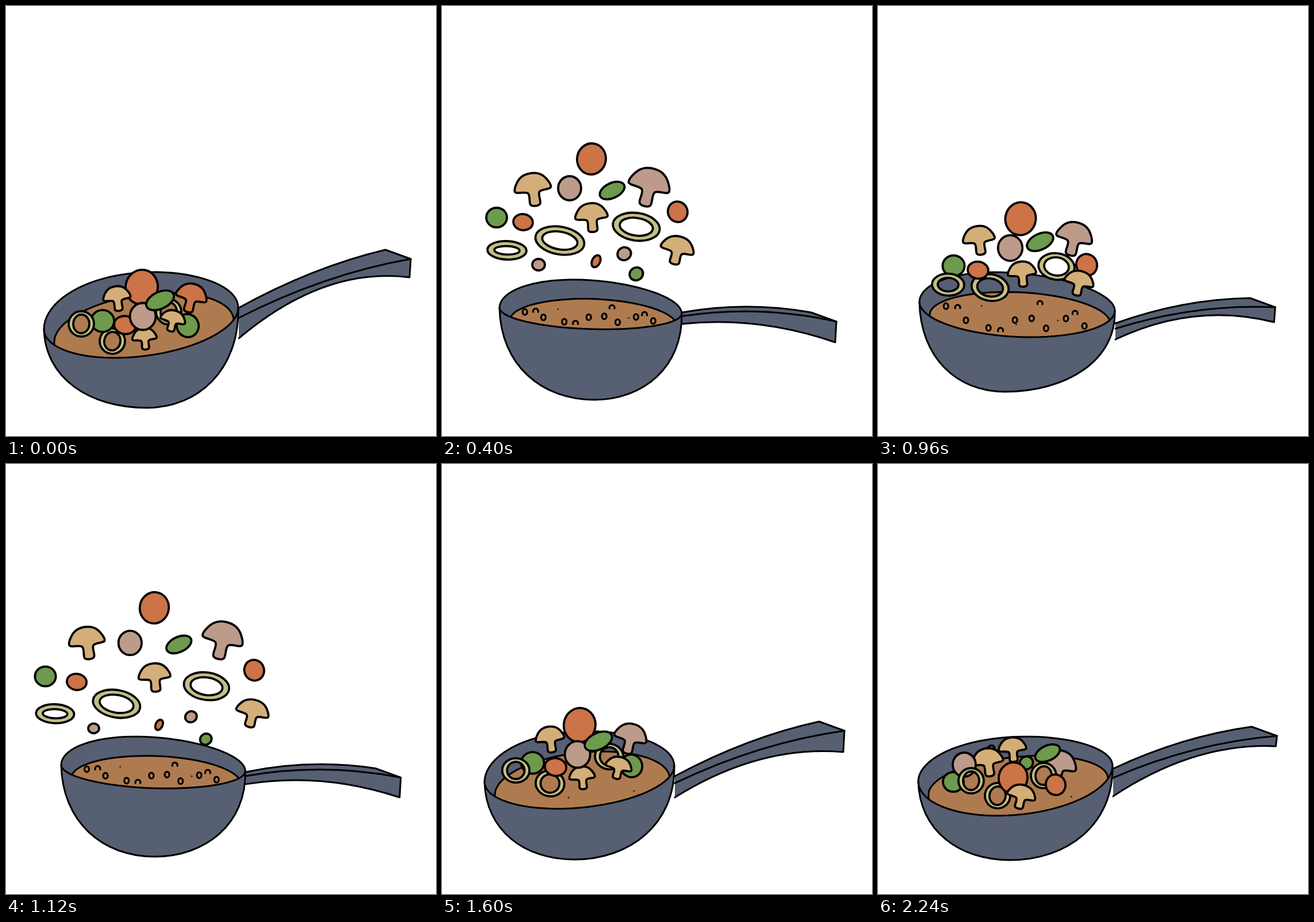
Recreate the animation shown at these times as an HTML page with a canvas. Size 748 by 748 pixels, loop 2320 ms.

```html
<!DOCTYPE html>
<html lang="en">
<head>
<meta charset="utf-8">
<title>Tossing vegetables</title>
<style>
html, body { margin: 0; width: 100%; height: 100%; overflow: hidden; background: #fff; }
canvas { display: block; width: 748px; height: 748px; }
</style>
</head>
<body>
<canvas id="stage" width="748" height="748"></canvas>
<script>
const ctx = document.getElementById('stage').getContext('2d');
const STEP = 80, COUNT = 29, TOSSES = 3;
const PEAK = 14, LAND = 26;   // beats within one toss of COUNT beats
const PAN = '#575f72', SOUP = '#ae7b50';
const ORANGE = '#cc7347', GREEN = '#6d9a4c', PINK = '#bd9b8b', TAN = '#d4ae79', LEEK = '#c3bf88';

const mix = (a, b, u) => a + (b - a) * u;
const mixAll = (a, b, u) => a.map((v, i) => mix(v, b[i], u));

// Key poses of the pan. rim: left and right ends; sag: height of the back and front arcs;
// base: lowest point; root: handle top and bottom at the bowl; tip: handle end, thickness, bow.
const pans = [
  { at: 0, rim: [66, 562, 404, 525], sag: [80, 66], base: [245, 699], root: [525, 578], tip: [704, 440, 32, 72] },
  { at: 2, rim: [74, 553, 404, 525], sag: [74, 59], base: [230, 688], root: [543, 580], tip: [700, 464, 37, 52] },
  { at: 7, rim: [72, 515, 412, 530], sag: [58, 53], base: [220, 671], root: [552, 580], tip: [691, 524, 26, 50] },
  { at: 14, rim: [100, 525, 417, 535], sag: [53, 32], base: [265, 685], root: [533, 553], tip: [686, 549, 36, 30] },
  { at: 19, rim: [74, 565, 424, 535], sag: [64, 41], base: [240, 699], root: [540, 564], tip: [692, 510, 21, 10] },
  { at: 26, rim: [70, 552, 408, 525], sag: [64, 72], base: [230, 689], root: [530, 578], tip: [694, 473, 18, 50] }
];

// Food from back to front: size [rx, ry, degrees] at the peak, then where it rests, peaks and lands.
const foods = [];
const add = (kind, color, size, rest, peak, land, cold) =>
  foods.push({ kind, color, size, rest, peak, land, cold });
add('bit', PINK, [11, 10, 0], [200, 510], [168, 450], [190, 508]);
add('bit', ORANGE, [7, 11, 25], [230, 520], [268, 444], [195, 500]);
add('bit', PINK, [12, 11, -30], [240, 530], [317, 431], [233, 490]);
add('bit', GREEN, [12, 11, -35], [270, 520], [338, 466], [258, 520]);
add('ring', LEEK, [43, 24, 10], [185, 583], [205, 408], [208, 577]);
add('blob', ORANGE, [17, 14, 8], [207, 555], [141, 376], [192, 508]);
add('cap', PINK, [72, 64, 14], [322, 507], [360, 314], [314, 525], [ORANGE, 1]);
add('cap', TAN, [56, 48, -5], [241, 578], [260, 367], [234, 496]);
add('blob', ORANGE, [25, 27, 10], [236, 489], [260, 266], [235, 546]);
add('ring', LEEK, [41, 24, 8], [283, 532], [338, 384], [288, 542]);
add('blob', ORANGE, [17, 18, -20], [316, 556], [410, 358], [309, 558], [GREEN, 4]);
add('cap', TAN, [58, 47, 14], [290, 547], [409, 424], [249, 578]);
add('cap', TAN, [63, 55, -8], [193, 508], [158, 318], [191, 518]);
add('blob', GREEN, [18, 17, 0], [168, 548], [95, 368], [131, 553]);
add('blob', PINK, [20, 21, 0], [238, 540], [222, 317], [150, 523]);
add('ring', LEEK, [34, 16, 2], [131, 553], [113, 425], [162, 551]);
add('blob', GREEN, [23, 13, -25], [268, 512], [296, 321], [295, 503]);

const CAP = [[-.5, .02], [-.33, -.37], [0, -.5], [.33, -.37], [.5, .02],
  [.17, .12], [.14, .5], [-.12, .5], [-.15, .12]];

function scatter(seed) {
  return () => (seed = (seed * 16807) % 2147483647) / 2147483647;
}

// Half ellipse hung between two ends; c runs from -1 (left) to 1 (right).
function onArc([x1, y1, x2, y2], height, c, lean = 0) {
  const u = (c + 1) / 2;
  return [mix(x1, x2, u), mix(y1, y2, u) - height * Math.sqrt(1 - c * c) * (1 - lean * c)];
}

function arc(ends, height, lean = 0, back = false) {
  for (let i = 0; i <= 40; i++) {
    const c = -Math.cos(Math.PI * i / 40) * (back ? -1 : 1);
    ctx.lineTo(...onArc(ends, height, c, lean));
  }
}

function bowl([x1, y1, x2, y2], [bx, by]) {
  ctx.lineTo(x1, y1);
  ctx.bezierCurveTo(x1 + 2, mix(y1, by, .62), mix(bx, x1, .56), by, bx, by);
  ctx.bezierCurveTo(mix(bx, x2, .56), by, x2 + 2, mix(y2, by, .62), x2, y2);
}

function paint(width, fill) {
  if (fill) { ctx.fillStyle = fill; ctx.fill('evenodd'); }
  if (width) { ctx.lineWidth = width; ctx.stroke(); }
}

function shape(build, width, fill) {
  ctx.beginPath();
  build();
  paint(width, fill);
}

// Curve from the current point that rises above the straight way.
function bowTo(x1, y1, x2, y2, rise) {
  ctx.quadraticCurveTo((x1 + x2) / 2, (y1 + y2) / 2 - rise, x2, y2);
}

function drawHandle({ rim, root, tip }) {
  const x = rim[2] + 1, [tx, ty, thick, bow] = tip;
  const kx = tx - 44, ky = ty - 16;
  shape(() => {
    ctx.moveTo(x, root[0]);
    bowTo(x, root[0], kx, ky, 20);
    ctx.lineTo(tx, ty);
    ctx.lineTo(tx - 2, ty + thick);
    bowTo(tx - 2, ty + thick, x, root[1], bow);
  }, 3, PAN);
  shape(() => {
    const y = mix(root[0], root[1], .33);
    ctx.moveTo(x, y);
    bowTo(x, y, tx, ty, 25);
  }, 3);
}

function drawBubbles(phase, surface, high, rim, low) {
  const rnd = scatter(77);
  const boiling = phase > 6 && phase < 22;
  const n = phase < 2 ? 0 : boiling ? 15 : 5;
  for (let i = 0; i < n; i++) {
    const c = mix(-.82, .82, (i + rnd()) / n);
    const [x, top] = onArc(surface, high, c);
    const y = mix(top + 8, onArc(rim, -low, c)[1] - 8, rnd());
    const dot = !boiling || i % 4 === 3;
    shape(() => {
      if (dot) ctx.arc(x, y, 1.7, 0, 7);
      else if (i % 4 === 1) ctx.arc(x, y, 4.5, Math.PI * .9, Math.PI * 2.1);
      else ctx.ellipse(x, y, 4, 5, 0, 0, 7);
    }, dot ? 0 : 3.2, dot ? '#4a2f1c' : null);
  }
}

function drawPan(pan, phase) {
  const { rim, sag, base } = pan;
  const [high, low] = sag;
  const surface = [rim[0] + 18, rim[1] + 22, rim[2] - 8, rim[3] + 22];
  const mouth = () => { arc(rim, high, .1); arc(rim, -low, 0, true); };
  drawHandle(pan);
  shape(() => { bowl(rim, base); arc(rim, -low, 0, true); }, 0, PAN);
  shape(mouth, 0, PAN);
  ctx.save();
  ctx.clip();
  shape(() => {
    ctx.moveTo(surface[0], 748);
    arc(surface, high * .8);
    ctx.lineTo(surface[2], 748);
  }, 3, SOUP);
  drawBubbles(phase, surface, high * .8, rim, low);
  ctx.restore();
  shape(mouth, 3);
  shape(() => bowl(rim, base), 3);
}

// Closed smooth curve through the middles of the edges, pulled towards the corners.
function closedCurve(p) {
  const n = p.length, at = i => p[(i + n) % n];
  ctx.moveTo(...p[0]);
  for (let i = 0; i < n; i++) {
    const [a, b, c, d] = [at(i - 1), at(i), at(i + 1), at(i + 2)];
    ctx.bezierCurveTo(b[0] + (c[0] - a[0]) / 6, b[1] + (c[1] - a[1]) / 6,
      c[0] - (d[0] - b[0]) / 6, c[1] - (d[1] - b[1]) / 6, c[0], c[1]);
  }
  ctx.closePath();
}

function place({ rest, peak, land }, phase) {
  if (phase >= LAND) return mixAll(land, rest, (phase - LAND) / (COUNT - LAND));
  if (phase <= PEAK) {
    const r = phase / PEAK;
    const lift = 1 - (1 - r) ** 1.1;
    // The cloud bursts outwards just before the peak.
    const burst = 1 + .2 * Math.sin(Math.PI * Math.max(0, 2 * r - 1) ** 4);
    return [260 + (mix(rest[0], peak[0], r) - 260) * burst,
      420 + (mix(rest[1], peak[1], lift) - 420) * burst];
  }
  const q = (phase - PEAK) / (LAND - PEAK);
  const [x, y] = mixAll(peak, land, q ** 1.2);
  return [mix(x, 300, .22 * Math.sin(Math.PI * q)), y];
}

// 0 in the pan, 1 at the peak.
function airborne(phase) {
  return phase <= PEAK ? phase / PEAK : Math.max(0, 1 - (phase - PEAK) / (LAND - PEAK));
}

function drawFood(food, phase) {
  const { kind, color, size, cold } = food;
  const [x, y] = place(food, phase);
  const air = airborne(phase);
  const settle = Math.max(0, (phase - LAND) / (COUNT - LAND));
  let [rx, ry, deg] = size;
  let scale = 1;
  if (kind === 'bit') scale = phase <= PEAK ? 2 * air - 1 : 1 - settle;
  if (kind === 'blob') scale = phase <= PEAK ? mix(1.12, 1, air) : 1 + .12 * settle;
  if (kind === 'cap') scale = phase <= PEAK ? mix(.75, 1, air) : mix(mix(.85, .75, settle), 1, air);
  if (scale < .1) return;

  ctx.save();
  ctx.translate(x, y);
  ctx.rotate(deg * Math.PI / 180);
  shape(() => {
    if (kind === 'cap') closedCurve(CAP.map(([u, v]) => [u * rx * scale, v * ry * scale]));
    else if (kind === 'ring') {
      rx = mix(22, rx, air);
      ry = mix(22, ry, air);
      const thick = mix(8, 12, air);
      ctx.ellipse(0, 0, rx, ry, 0, 0, 7);
      ctx.closePath();
      ctx.moveTo(rx - thick, 0);
      ctx.ellipse(0, 0, rx - thick, ry - thick * .72, 0, 0, Math.PI * 2);
    } else ctx.ellipse(0, 0, rx * scale, ry * scale, 0, 0, Math.PI * 2);
  }, 3.8, cold && phase < cold[1] ? cold[0] : color);
  ctx.restore();
}

function panAt(phase) {
  const i = pans.filter(p => p.at <= phase).length - 1;
  const a = pans[i], b = pans[(i + 1) % pans.length];
  const u = (phase - a.at) / ((b.at || COUNT) - a.at);
  const pan = {};
  for (const part of ['rim', 'sag', 'base', 'root', 'tip']) pan[part] = mixAll(a[part], b[part], u);
  return pan;
}

function draw(phase) {
  ctx.fillStyle = '#fff';
  ctx.fillRect(0, 0, 748, 748);
  ctx.strokeStyle = '#000';
  ctx.lineJoin = ctx.lineCap = 'round';
  ctx.save();
  // The pan gives way as it catches the food.
  const give = (phase - 19) / 7;
  if (give > 0 && give < 1) ctx.translate(0, 15 * Math.sin(Math.PI * give));
  drawPan(panAt(phase), phase);
  for (const food of foods) drawFood(food, phase);
  ctx.restore();
}

const start = performance.now();
let shown = -1;
function tick() {
  const n = Math.floor(Math.max(0, performance.now() - start) / STEP) % COUNT;
  if (n !== shown) {
    shown = n;
    const phase = n * TOSSES % COUNT;
    // The rest and the peak are each held for one extra beat.
    draw(phase === 1 || phase === PEAK + 1 ? phase - 1 : phase);
  }
  requestAnimationFrame(tick);
}
tick();
</script>
</body>
</html>
```
